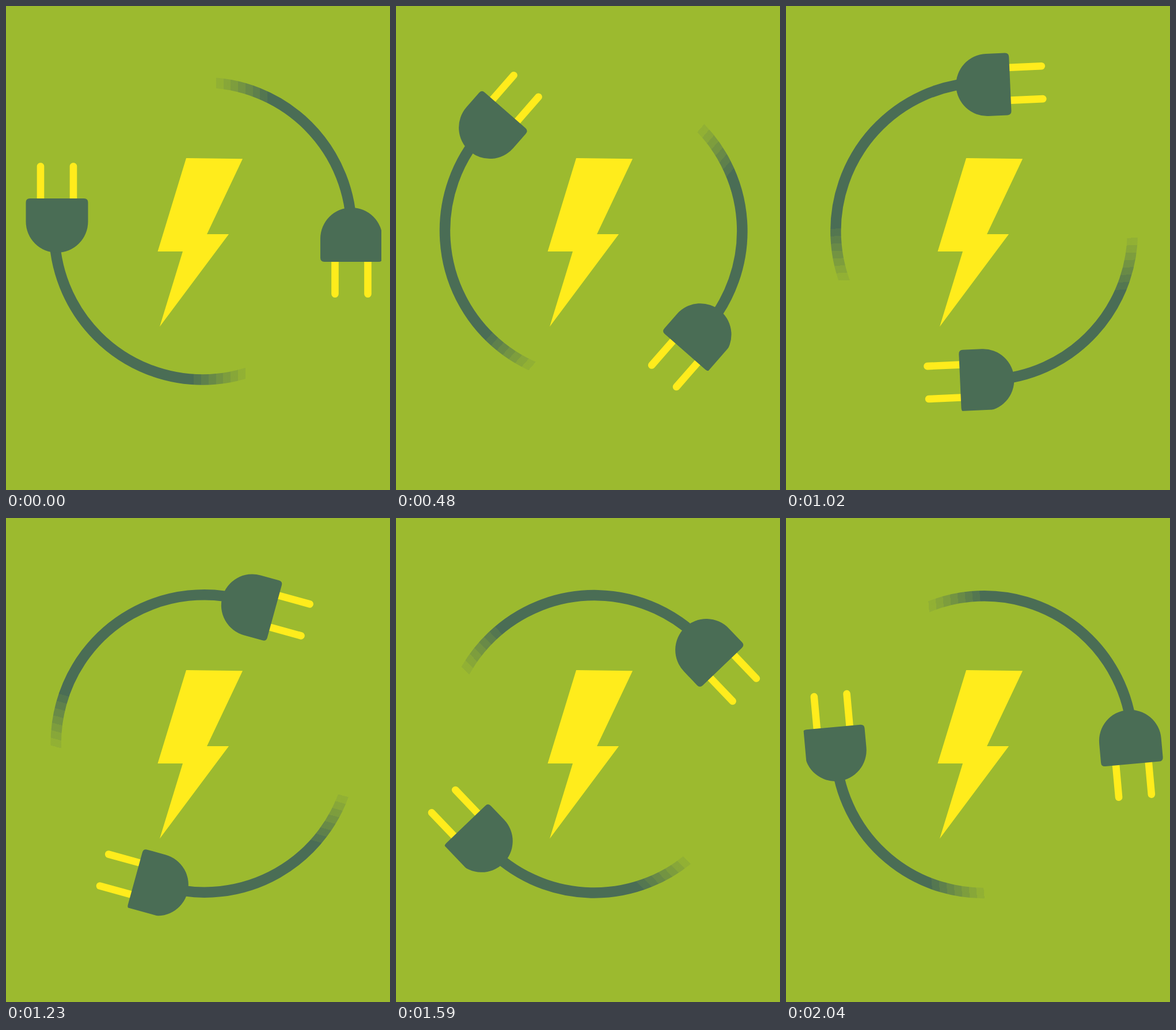
Recreate the animation shown at these times as an HTML page. Size 667 by 840 pixels, loop 2070 ms.

```html
<!DOCTYPE html>
<html lang="en">
<head>
<meta charset="utf-8">
<title>Plugs and bolt</title>
<style>
  html, body { margin: 0; width: 100%; height: 100%; overflow: hidden; background: #9cba2f; }
  svg { display: block; width: 100%; height: 100%; }
</style>
</head>
<body>
<svg viewBox="0 0 667 840">
  <defs>
    <linearGradient id="fadeA" gradientUnits="userSpaceOnUse" x1="326" x2="416" y1="0" y2="0"></linearGradient>
    <linearGradient id="fadeB" gradientUnits="userSpaceOnUse" x1="454" x2="365" y1="0" y2="0"></linearGradient>
    <clipPath id="trim"><rect x="500" y="300" width="152" height="250"/></clipPath>
    <g id="plug">
      <path d="M60 340V278.3M117 340V278.3" stroke="#ffec1c" stroke-width="12.6" stroke-linecap="round"/>
      <path d="M34.5 341q0-7 7-7H135.5q7 0 7 7V374A54 54 0 0 1 34.5 374Z" fill="#4a6d55"/>
    </g>
  </defs>
  <rect width="667" height="840" fill="#9cba2f"/>
  <path d="M313 264 411 265.3 349 396H387L267 556.5 307 426H263.5Z" fill="#ffec1c"/>
  <g id="spinner" fill="none" stroke-width="18.5">
    <path id="cableA" stroke="url(#fadeA)"/>
    <path id="cableB" stroke="url(#fadeB)"/>
    <use href="#plug" stroke-width="0"/>
    <g clip-path="url(#trim)">
      <use href="#plug" transform="rotate(180 344.25 389)" stroke-width="0"/>
    </g>
  </g>
</svg>
<script>
  const STEP_MS = 30, STEPS = 69, STEPS_PER_HALF_TURN = 70;
  const PIVOT = "342.9 391.9";
  const BANDS = 7;
  const byId = id => document.getElementById(id);

  // Hard-edged bands: solid cable, then BANDS fading strips, then nothing.
  function fillFade(gradient) {
    const addStop = (offset, opacity) => {
      const stop = document.createElementNS("http://www.w3.org/2000/svg", "stop");
      stop.setAttribute("offset", offset);
      stop.setAttribute("stop-color", "#4a6d55");
      stop.setAttribute("stop-opacity", opacity);
      gradient.append(stop);
    };
    addStop(0, 1);
    for (let i = 0; i < BANDS; i++) {
      const opacity = (BANDS - i) / (BANDS + 1);
      addStop(i / BANDS, opacity);
      addStop((i + 1) / BANDS, opacity);
    }
    addStop(1, 0);
  }

  // Half circle starting inside the plug; side is -1 for left, 1 for right.
  function halfCircle(cx, cy, r, side) {
    return `M${cx + side * r} ${cy}A${r} ${r} 0 0 0 ${cx - side * r} ${cy}`;
  }

  fillFade(byId("fadeA"));
  fillFade(byId("fadeB"));
  byId("cableA").setAttribute("d", halfCircle(341.5, 390.7, 257.7, -1));
  byId("cableB").setAttribute("d", halfCircle(342.9, 389.9, 257.2, 1));

  const spinner = byId("spinner");
  function draw(ms) {
    const step = Math.floor(ms / STEP_MS) % STEPS;
    spinner.setAttribute("transform", `rotate(${step * 180 / STEPS_PER_HALF_TURN} ${PIVOT})`);
  }

  const start = performance.now();
  function tick() {
    draw(performance.now() - start);
    requestAnimationFrame(tick);
  }
  tick();
</script>
</body>
</html>
```
